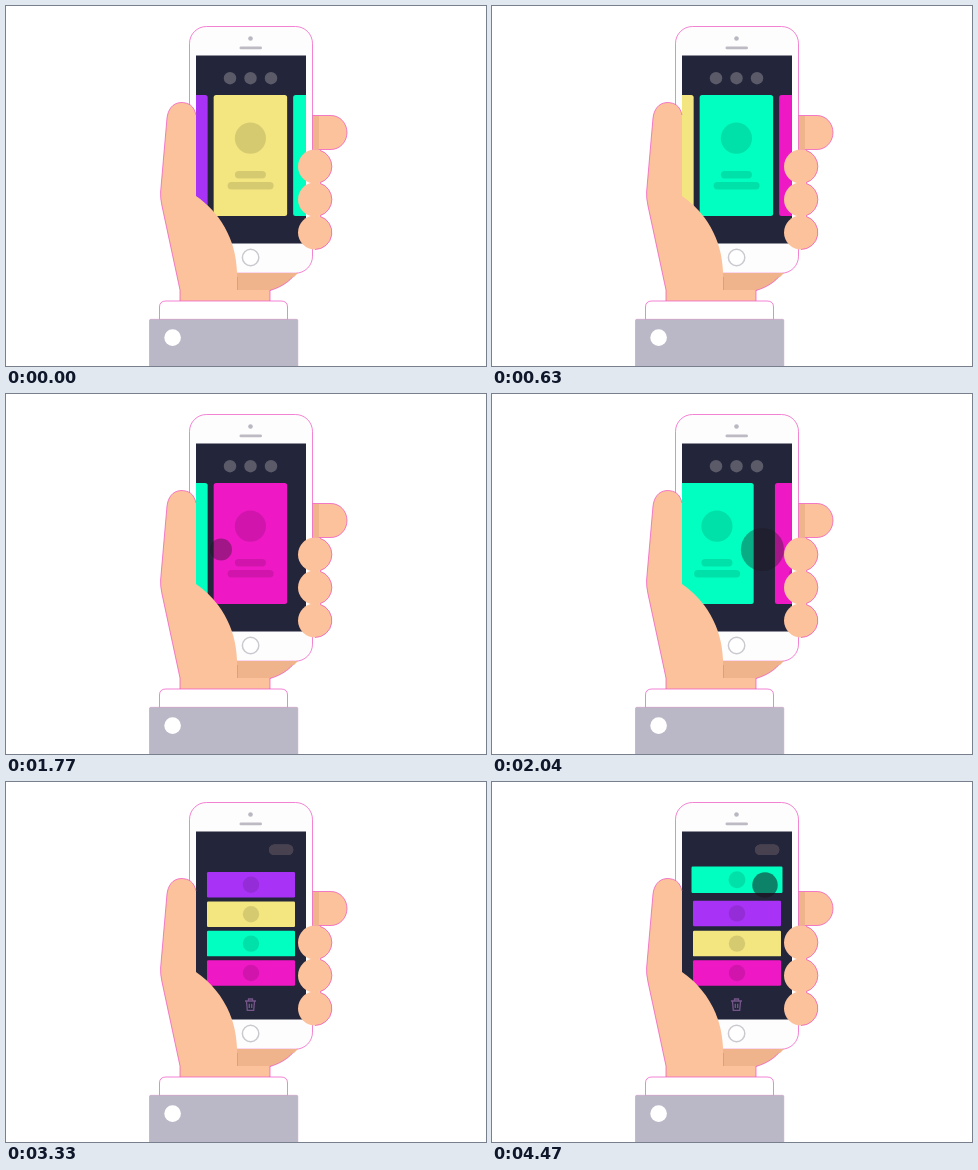
Write an HTML page that moves like this. It is 480 by 360 pixels and loops after 4500 ms.

```html
<!DOCTYPE html>
<html lang="en">
<head>
<meta charset="utf-8">
<title>Card carousel on a phone</title>
<style>
  html, body { margin: 0; width: 100%; height: 100%; overflow: hidden; background: #fff; }
  svg { display: block; width: 100%; height: 100%; }
  .skin { fill: #fbc29c; }
  .shade { fill: #f0b48c; }
  .rim { stroke: #ee4fc0; stroke-width: .7; }
  .ink { fill: #000; fill-opacity: .12; }
  .dots { fill: #5a5a68; }
</style>
</head>
<body>
<svg viewBox="0 0 480 360">
  <defs>
    <clipPath id="screen"><rect x="190" y="49.5" width="110" height="188"/></clipPath>
  </defs>

  <!-- behind the phone -->
  <path class="skin rim" d="M300 109.5H325A16 17 0 0 1 325 143.5H300Z"/>
  <path class="shade" d="M304 110H313V143.5H304Z"/>
  <path class="shade rim" d="M231 262H293C287 274 276 281 264 284.5H231Z"/>

  <!-- phone -->
  <rect class="rim" x="183.5" y="20.5" width="123" height="246.7" rx="17" fill="#fdfdfd"/>
  <path class="shade" d="M231 267H292L288 271H231Z"/>
  <circle cx="244.5" cy="32.5" r="2.3" fill="#b9b7c2"/>
  <rect x="233.5" y="40.5" width="22.5" height="2.8" rx="1.4" fill="#bdbac4"/>
  <circle cx="244.6" cy="251.5" r="8.2" fill="#fff" stroke="#cbc9cf" stroke-width="1.5"/>

  <g clip-path="url(#screen)">
    <rect x="190" y="49" width="110" height="189" fill="#23253a"/>
    <g id="dots" class="dots"></g>
    <g id="trash" fill="none" stroke="#75568a" stroke-width="1.3">
      <path d="M239 219H250M242.5 218.500V217H246.500V218.500M240.500 219.500L241.300 228.400H247.700L248.500 219.500M243.300 221.800V226M245.700 221.800V226"/>
    </g>
    <g id="cards"></g>
    <circle id="touch" fill="#18141c"/>
  </g>

  <!-- in front of the phone -->
  <path class="skin" d="M190 109C188 100 183 96.500 175 96.500C166 97 162 104 161 112L154.600 186Q154.200 192 156 200L174 284V296H264V284H231V266C230 232 213 206 190 190Z"/>
  <path class="rim" fill="none" d="M190 109C188 100 183 96.500 175 96.500C166 97 162 104 161 112L154.600 186Q154.200 192 156 200L174 284V296M264 296V284"/>
  <g class="skin">
    <circle cx="309" cy="160.500" r="17"/>
    <circle cx="309" cy="193.500" r="17"/>
    <circle cx="309" cy="226.500" r="17"/>
  </g>
  <g class="rim" fill="none">
    <path d="M314 144.300A17 17 0 0 1 314 176.700"/>
    <path d="M314 177.300A17 17 0 0 1 314 209.700"/>
    <path d="M314 210.300A17 17 0 0 1 309 243.500"/>
  </g>

  <!-- cuff and sleeve -->
  <path class="rim" fill="#fff" d="M153.500 314V301Q153.500 295 160 295H275Q281.500 295 281.500 301V314Z"/>
  <path d="M143.500 361V314.500Q143.500 313.300 145 313.300H290.500Q291.800 313.300 291.800 314.500V361Z" fill="#bab8c6" stroke="#c99bc4" stroke-width=".6"/>
  <circle cx="166.600" cy="331.600" r="8.300" fill="#fff"/>
</svg>

<script>
const LOOP = 4500, PITCH = 79.5;
const PURPLE = 0, GREEN = 2;
const COLORS = ['#a832f5', '#f3e680', '#00ffc0', '#ee18c4'];
const SWIPES = [
  { at: 105, from: 1, dir: 1 },
  { at: 900, from: 2, dir: 1 },
  { at: 1650, from: 3, dir: -1 }
];
const HOLD = { at: 2370, release: 2880 };
const DRAG = { at: 3690, release: 4440 };

const $ = id => document.getElementById(id);
const clamp = v => Math.max(0, Math.min(1, v));
const mix = (a, b, p) => a + (b - a) * p;
const ease = u => u < .5 ? 2 * u * u : 1 - 2 * (1 - u) ** 2;
const span = (t, start, length) => ease(clamp((t - start) / length));

function add(parent, tag, attrs) {
  const el = document.createElementNS('http://www.w3.org/2000/svg', tag);
  set(el, attrs);
  parent.append(el);
  return el;
}
function set(el, attrs) {
  for (const key in attrs) el.setAttribute(key, attrs[key]);
}

const cards = COLORS.map(fill => {
  const g = add($('cards'), 'g', {});
  const bar = (x, y, width) =>
    add(g, 'rect', { class: 'ink', x, y, width, height: 7.5, rx: 3.7 });
  return {
    g,
    box: add(g, 'rect', { fill }),
    face: add(g, 'circle', { class: 'ink', cx: 0 }),
    bars: [bar(-15.5, 15.5, 31), bar(-22.8, 26.5, 46)]
  };
});
$('cards').append(cards[GREEN].g); // the dragged row stays on top
const dots = [224, 244.5, 265].map(x => ({ x, el: add($('dots'), 'rect', {}) }));

const swipeMove = (t, s, lag) => span(t, s.at + 257 + lag, 160);

// Cards further from the leading one follow with a delay.
function carouselX(i, t) {
  let x = 244.4 + (i - 1) * PITCH;
  for (const s of SWIPES) {
    const lag = 30 * Math.max(0, (i - s.from) * s.dir);
    x -= s.dir * PITCH * swipeMove(t, s, lag);
  }
  return x;
}

function rowY(i, t) {
  const y = 102.8 + i * 29.4;
  if (i === GREEN) return y - 63.8 * span(t, 3930, 510);
  if (i > GREEN) return y;
  return y + 29.4 * span(t, i === PURPLE ? 4250 : 4080, 250);
}

function drawCard(card, i, t) {
  const p = span(t, 2900 + i * 25, 330);
  const w = mix(73.5, 88, p), h = mix(121, 25.5, p);
  const x = mix(carouselX(i, t), 245, p);
  const y = mix(149.5, rowY(i, t), p);
  const scale = i === GREEN ? 1 + .034 * span(t, 3900, 90) : 1;
  set(card.g, { transform: `translate(${x} ${y}) scale(${scale})` });
  set(card.box, { x: -w / 2, y: -h / 2, width: w, height: h, rx: mix(2.5, 1.2, p) });
  set(card.face, { cy: mix(-17.3, 0, p), r: mix(15.6, 8.2, p) });
  card.bars.forEach(bar => set(bar, { opacity: clamp(1 - p * 3) }));
}

function drawHeader(t) {
  const p = span(t, 2900, 360);
  for (const { x, el } of dots) {
    set(el, {
      x: mix(x - 6.2, 263, p), y: mix(66, 62.5, p),
      width: mix(12.4, 24.3, p), height: mix(12.4, 10.6, p), rx: mix(6.2, 5.3, p)
    });
  }
  const tone = [[90, 72], [90, 66], [104, 80]].map(([a, b]) => Math.round(mix(a, b, p)));
  $('dots').style.fill = `rgb(${tone})`;
  set($('trash'), { opacity: span(t, 3120, 190) });
}

// The touch shrinks in when pressed, then spreads and fades when let go.
function drawTouch(t) {
  let start = 0, release = 0, x = 268, y = 158;
  const swipe = SWIPES.find(s => t >= s.at && t < s.at + 450);
  if (swipe) {
    start = swipe.at;
    release = start + 300;
    const p = swipeMove(t, swipe, 0);
    x = swipe.dir > 0 ? mix(275, 215, p) : mix(215, 273.5, p);
    y = 155.5;
  } else if (t >= HOLD.at && t < HOLD.release + 150) {
    start = HOLD.at;
    release = HOLD.release;
  } else if (t >= DRAG.at) {
    start = DRAG.at;
    release = DRAG.release;
    x = 273;
    y = rowY(GREEN, t) + 5.3;
  } else {
    set($('touch'), { opacity: 0 });
    return;
  }
  const press = span(t, start, 210);
  const q = clamp((t - release) / 150);
  set($('touch'), {
    cx: x, cy: y,
    r: mix(16, 8.2, press) + 22 * q,
    opacity: .55 * press * (1 - q * q)
  });
}

function draw(t) {
  cards.forEach((card, i) => drawCard(card, i, t));
  drawHeader(t);
  drawTouch(t);
}

const begin = performance.now();
function tick() {
  draw((performance.now() - begin) % LOOP);
  requestAnimationFrame(tick);
}
draw(0);
requestAnimationFrame(tick);
</script>
</body>
</html>
```
